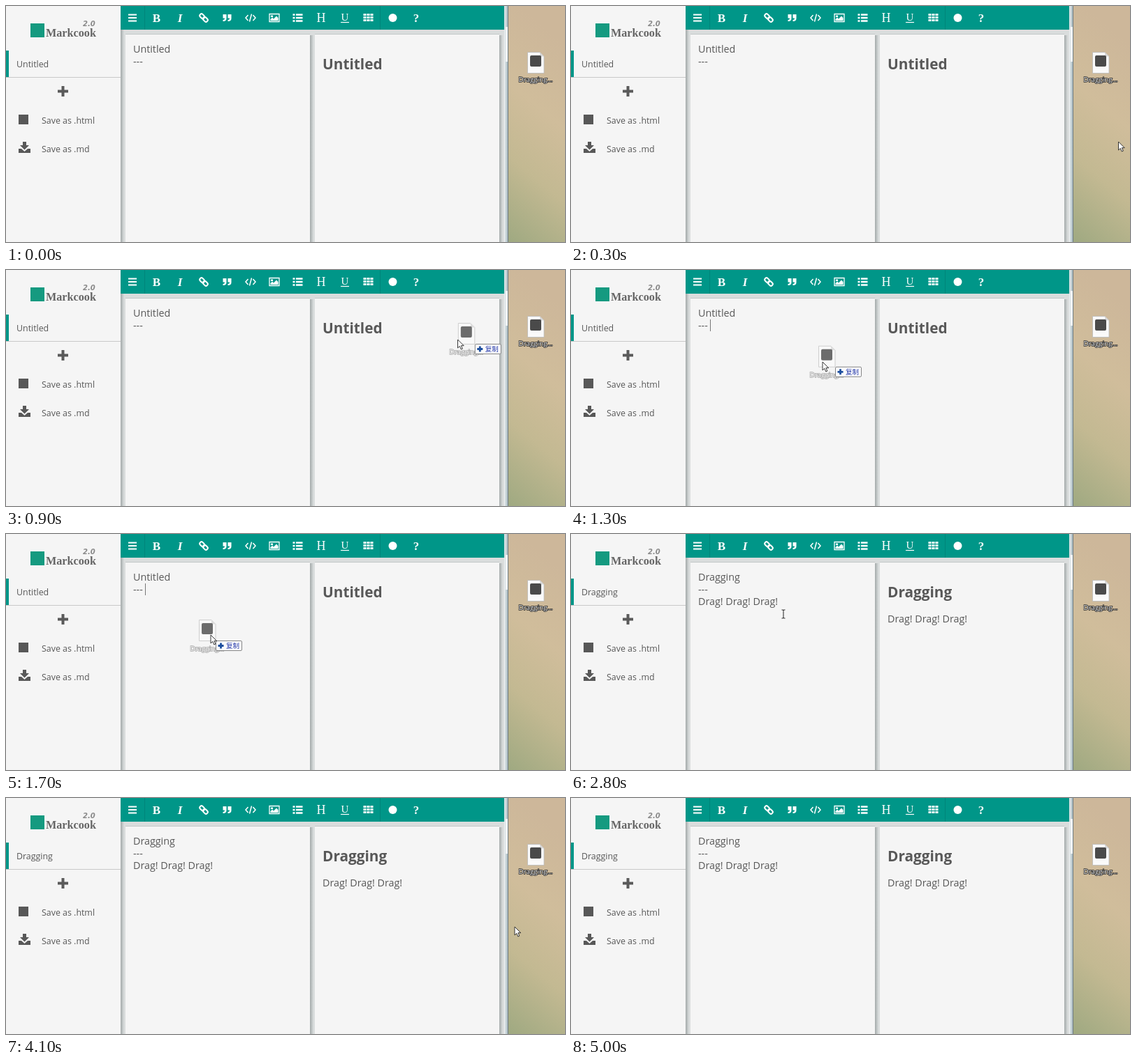
An HTML page for the animation above (5.1 s loop, 800 px wide and 339 px high).

```html
<!DOCTYPE html>
<html lang="en">
<head>
<meta charset="utf-8">
<title>Drag a file into the editor</title>
<style>
  html, body { margin: 0; width: 100%; height: 100%; overflow: hidden; background: #f5f5f5; }
  svg { display: block; width: 100vw; height: 100vh; }
  text { font-family: "Open Sans", "Noto Sans", sans-serif; fill: #585858; white-space: pre; }
  .body { font-size: 14.3px; }
  .title { font-size: 20.8px; font-weight: 700; }
  .side { font-size: 12.4px; }
  .tool { font: 700 17px "Liberation Serif", "Noto Serif", serif; fill: #fff; text-anchor: middle; }
  .brand { font: 700 16.2px "Liberation Serif", serif; fill: #666; }
  .label { font-size: 9.8px; fill: #fff; text-anchor: middle; paint-order: stroke; stroke: #222; stroke-width: 1.6px; }
  .copy { font: 9.5px "Noto Sans CJK SC", "Noto Sans CJK", sans-serif; fill: #2438a8; }
</style>
</head>
<body>
<svg viewBox="0 0 800 339" preserveAspectRatio="none">
  <defs>
    <linearGradient id="desk" x1="0.2" y1="0" x2="0" y2="1">
      <stop offset="0" stop-color="#cdb79a"/>
      <stop offset=".35" stop-color="#d0bd9b"/>
      <stop offset=".65" stop-color="#c3b992"/>
      <stop offset="1" stop-color="#9fa981"/>
    </linearGradient>
    <linearGradient id="shade">
      <stop offset="0" stop-color="#a3a9a9"/>
      <stop offset="1" stop-color="#d9dddd"/>
    </linearGradient>
    <linearGradient id="edge">
      <stop offset="0" stop-color="#e4eaec"/>
      <stop offset=".6" stop-color="#bccbd0"/>
      <stop offset="1" stop-color="#9aa9af"/>
    </linearGradient>
    <g id="page">
      <path d="M.5.5H18L24 6.5V30.5H.5Z" fill="#fafafa" stroke="#b9b9b9" stroke-width=".8"/>
      <path d="M18 .5V6.5H24Z" fill="#d8d8d8"/>
      <rect x="4" y="5" width="16" height="16" rx="2" fill="#4a4a4a"/>
    </g>
  </defs>

  <rect x="719" width="81" height="339" fill="url(#desk)"/>
  <rect width="719" height="339" fill="#dadddd"/>
  <g id="panes"></g>
  <rect x="164" width="549" height="34" fill="#009688"/>
  <path d="M198.5 0V34M535.5 0V34" stroke="#00857a"/>
  <rect x="713" width="6" height="339" fill="url(#edge)"/>
  <path d="M713.5 34V339" stroke="#eef1f2"/>
  <path d="M718.5 0V339" stroke="#707d83"/>
  <rect x="715" y="30" width="3" height="50" fill="#f2f5f6"/>

  <rect width="164" height="339" fill="#f5f5f5"/>
  <rect x="164" y="34" width="5" height="305" fill="url(#shade)"/>
  <rect x="35" y="25" width="20" height="20" fill="#159a80"/>
  <text class="brand" x="57" y="44">Markcook</text>
  <text x="110" y="29" style="font:italic 700 10px 'DejaVu Sans',sans-serif;fill:#8a8a8a">2.0</text>
  <rect y="64" width="4" height="38" fill="#009688"/>
  <path d="M0 102.5H164" stroke="#c8c8c8"/>
  <text id="tab" class="side" x="15" y="88"></text>
  <path d="M81.5 115V130M74 122.5H89" stroke="#5a5a5a" stroke-width="4"/>
  <rect x="18" y="156" width="14" height="14" fill="#585858"/>
  <text class="side" x="51" y="169">Save as .html</text>
  <path d="M24 195H29V200H33L26.5 206.5L20 200H24ZM18 205H22L26.5 209L31 205H35V211H18Z" fill="#585858"/>
  <text class="side" x="51" y="210">Save as .md</text>

  <g id="tools"></g>

  <text id="head" class="body" x="182" y="67"></text>
  <text class="body" x="182" y="85">---</text>
  <text id="line" class="body" x="182" y="102">Drag! Drag! Drag!</text>
  <path id="caret" d="M199.5 71V88" stroke="#777"/>
  <text id="outHead" class="title" x="453" y="91"></text>
  <text id="outLine" class="body" x="453" y="127">Drag! Drag! Drag!</text>

  <rect id="hover" x="731.5" y="60.5" width="54" height="53" rx="2" fill="#e3e8ee" fill-opacity=".55" stroke="#e4ebf2" stroke-opacity=".8"/>
  <use href="#page" x="746" y="66"/>
  <text class="label" x="758" y="109">Dragging...</text>

  <g id="ghost">
    <use href="#page" opacity=".8"/>
    <text class="label" x="12" y="45" opacity=".6" style="stroke:#777">Dragging...</text>
    <g id="badge">
      <rect x="24.5" y="30.5" width="37" height="14" rx="1.5" fill="#fbfbfd" stroke="#858585"/>
      <path d="M31.5 33.5V41.5M27.5 37.5H35.5" stroke="#1d4f9e" stroke-width="2.8"/>
      <text class="copy" x="39" y="41">复制</text>
    </g>
  </g>
  <path id="arrow" d="M0 0V12L2.8 9.4L4.8 14L6.8 13.1L4.9 8.7H8.7Z" fill="#fff" stroke="#222" stroke-width=".9"/>
  <path id="beam" d="M-2.5 -6H-.8L0 -5.2L.8 -6H2.5M0 -5.2V5.2M-2.5 6H-.8L0 5.2L.8 6H2.5" fill="none" stroke="#333" stroke-width="1.1"/>
</svg>
<script>
const $ = id => document.getElementById(id);
const LOOP = 5100, STEP = 100, DROP = 2200;

// Pointer path: time, x, y
const path = [
  [200, 792, 250], [400, 775, 140], [600, 763, 86], [700, 763, 87],
  [800, 733, 90], [1000, 560, 110], [1200, 415, 126], [1300, 360, 132],
  [1680, 293, 145], [2700, 293, 145], [2800, 304, 115], [3100, 312, 99],
  [3300, 312, 99], [3600, 541, 87], [3900, 586, 122], [4000, 650, 150], [4200, 806, 220]
];

function at(t) {
  const i = path.findIndex(k => k[0] >= t);
  if (i < 0) return path[path.length - 1].slice(1);
  if (i === 0) return path[0].slice(1);
  const [t0, x0, y0] = path[i - 1], [t1, x1, y1] = path[i];
  const p = (t - t0) / (t1 - t0);
  return [x0 + (x1 - x0) * p, y0 + (y1 - y0) * p];
}

function pane(x) {
  return `<rect x="${x + 264}" y="42" width="5" height="297" fill="url(#shade)"/>
    <rect x="${x}" y="41" width="264" height="298" fill="#f5f5f5"/>
    <path d="M${x} 40.5H${x + 264}" stroke="#c3c8c8"/>`;
}

function drawTools() {
  const fill = d => `<path d="${d}" fill="#fff"/>`;
  const line = (d, w = 2) => `<path d="${d}" fill="none" stroke="#fff" stroke-width="${w}"/>`;
  const letter = (c, style = '') => `<text class="tool" y="6" style="${style}">${c}</text>`;
  const quote = x => `M${x} -5h5v6q0 4 -5 4v-2q2.500 0 2.500 -2.500h-2.500Z`;
  let grid = '';
  for (let r = 0; r < 3; r++)
    for (let c = 0; c < 3; c++) grid += `M${c * 5 - 7} ${r * 4 - 6}h4v3h-4Z`;
  const link = x => `<rect x="${x}" y="-2.500" width="7.500" height="5" rx="2.300" fill="none" stroke="#fff" stroke-width="2"/>`;
  const icons = [
    [181, line('M-6 -4.500H6M-6 0H6M-6 4.500H6')],
    [215.5, letter('B')],
    [249, letter('I', 'font-style:italic')],
    [283, `<g transform="rotate(45)">${link(-7)}${link(-.5)}</g>`],
    [317, fill(quote(-6.5) + quote(.5))],
    [350, line('M-3.500 -4L-7 0L-3.500 4M3.500 -4L7 0L3.500 4M1.500 -5.500L-1.500 5.500', 1.5)],
    [384, line('M-7 -5.500H7V5.500H-7Z', 1.3) + fill('M-5.500 4V2L-3 -.5L-1 1.500L3 -2.500L5.500 0V4ZM-5 -3.500h3v2.500h-3Z')],
    [417.5, line('M-7 -4.500h3M-7 0h3M-7 4.500h3M-2.500 -4.500H7M-2.500 0H7M-2.500 4.500H7', 2.3)],
    [451, letter('H', 'font-weight:400;font-size:18px')],
    [485, `<text class="tool" y="4" style="font-weight:400;font-size:15px">U</text>` + line('M-6 6.500H6', 1.2)],
    [518.5, fill(grid)],
    [553.5, '<circle r="6" fill="#fff"/>'],
    [587, letter('?', 'font:700 14px "DejaVu Sans",sans-serif')]
  ];
  return icons.map(([x, s]) => `<g transform="translate(${x} 17)">${s}</g>`).join('');
}

const show = (id, on) => $(id).setAttribute('visibility', on ? 'inherit' : 'hidden');
const move = (id, x, y) => $(id).setAttribute('transform', `translate(${x.toFixed(1)} ${y.toFixed(1)})`);

function render(t) {
  const [x, y] = at(t), [gx, gy] = at(t - 20);
  const dropped = t >= DROP, dragging = t >= 800 && !dropped;
  const pointer = t >= 200 && t < 4300;
  const beam = dropped && x < 706;
  for (const id of ['tab', 'head', 'outHead']) $(id).textContent = dropped ? 'Dragging' : 'Untitled';
  show('line', dropped);
  show('outLine', dropped);
  show('caret', t >= 1200 && !dropped);
  show('hover', pointer && !dropped && x > 731 && y < 113);
  show('ghost', dragging);
  show('badge', gx < 713);
  show('arrow', pointer && !beam);
  show('beam', pointer && beam);
  move('ghost', gx - 17, gy - 22);
  move('arrow', x, y);
  move('beam', x, y);
}

$('panes').innerHTML = pane(171) + pane(442);
$('tools').innerHTML = drawTools();

const start = performance.now();
function tick() {
  const t = (performance.now() - start) % LOOP;
  render(Math.floor(t / STEP) * STEP);
  requestAnimationFrame(tick);
}
tick();
</script>
</body>
</html>
```
